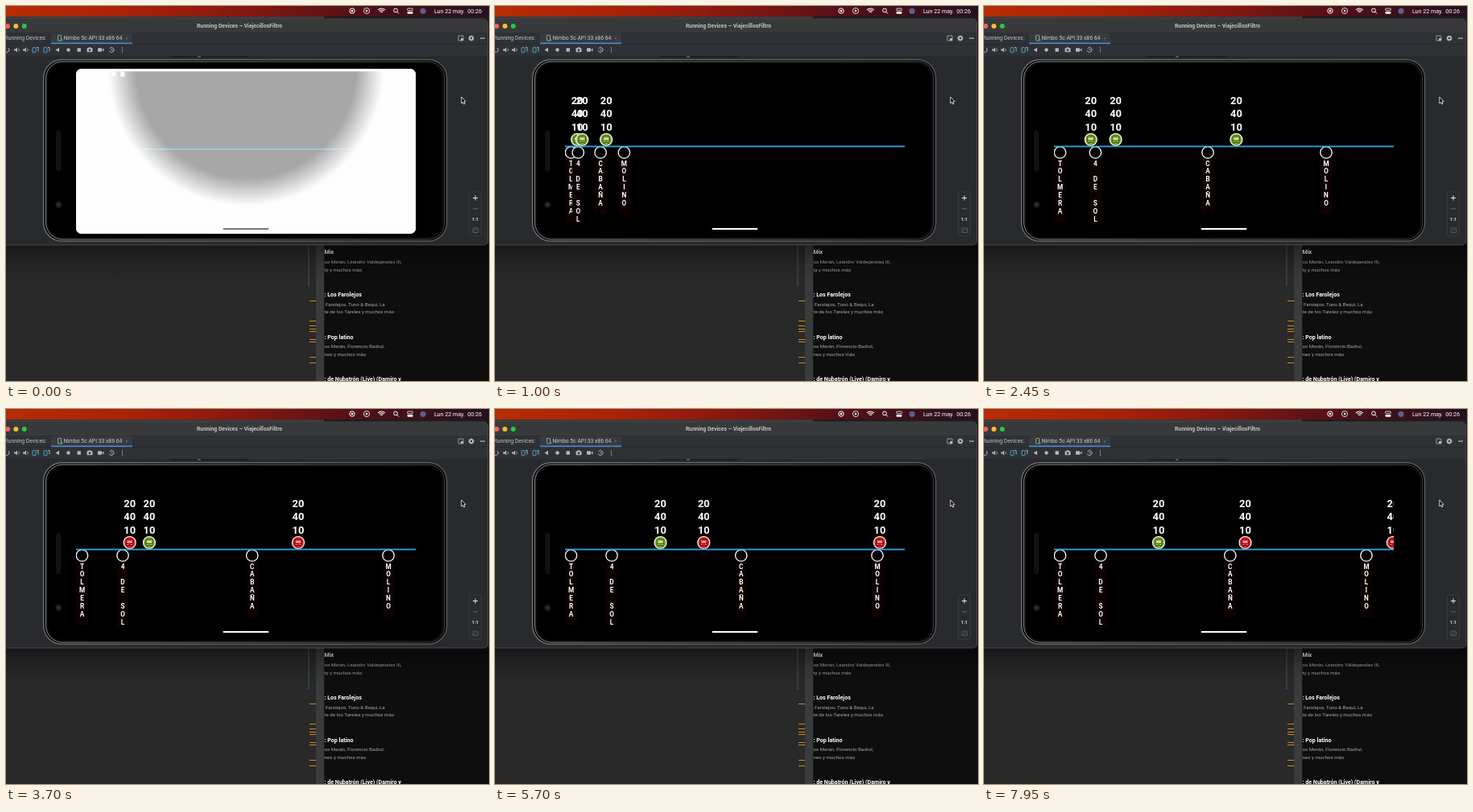
These frames come from a looping animation (600 by 466 pixels, 8000 ms). An HTML page with a canvas:

```html
<!DOCTYPE html>
<html lang="es">
<head>
<meta charset="utf-8">
<title>Running Devices</title>
<style>
html, body { margin: 0; width: 100%; height: 100%; overflow: hidden; background: #101010; }
canvas { display: block; width: 600px; height: 466px; }
</style>
</head>
<body>
<canvas id="stage"></canvas>
<script>
const W = 600, H = 466, LOOP = 8000;
const canvas = document.getElementById('stage');
const dpr = window.devicePixelRatio || 1;
canvas.width = W * dpr;
canvas.height = H * dpr;
const view = canvas.getContext('2d');
let g = view;

const SCREEN = { x: 87, y: 78, w: 422, h: 205 };
const ORIGIN = 94.5;
const stops = [
  { at: 0, name: 'TOLMERA' },
  { at: 50.5, name: '4 DE SOL' },
  { at: 211.3, name: 'CABAÑA' },
  { at: 380.5, name: 'MOLINO' }
];
// Offsets along the line after each position update.
const buses = [
  { at: [44, 164.8, 253], late: true },
  { at: [79.5, 111, 126.5], late: false },
  { at: [252, 383.5, 424], late: true }
];
const OPEN = [640, 2725], MOVE = [3450, 5450], MOVE2 = [6450, 8480];

const clamp = v => Math.max(0, Math.min(1, v));
const span = (t, [a, b]) => clamp((t - a) / (b - a));
const mix = (a, b, p) => a + (b - a) * p;

function rect(x, y, w, h, fill) {
  g.fillStyle = fill;
  g.fillRect(x, y, w, h);
}

function round(x, y, w, h, r, fill, stroke, lw = 1) {
  g.beginPath();
  g.roundRect(x, y, w, h, r);
  paint(fill, stroke, lw);
}

function circle(x, y, r, fill, stroke, lw = 1) {
  g.beginPath();
  g.arc(x, y, r, 0, Math.PI * 2);
  paint(fill, stroke, lw);
}

function paint(fill, stroke, lw) {
  if (fill) { g.fillStyle = fill; g.fill(); }
  if (stroke) { g.strokeStyle = stroke; g.lineWidth = lw; g.stroke(); }
}

function path(points, stroke, lw = 1, fill) {
  g.beginPath();
  points.forEach(([x, y], i) => i ? g.lineTo(x, y) : g.moveTo(x, y));
  if (fill) g.closePath();
  paint(fill, stroke, lw);
}

function text(s, x, y, size, fill, weight = 400, align = 'left') {
  g.font = `${weight} ${size}px Roboto, sans-serif`;
  g.textAlign = align;
  g.textBaseline = 'alphabetic';
  g.fillStyle = fill;
  g.fillText(s, x, y + size * 0.355);
}

function ramp(x0, y0, x1, y1, ...colors) {
  const grad = g.createLinearGradient(x0, y0, x1, y1);
  colors.forEach((c, i) => grad.addColorStop(i / (colors.length - 1), c));
  return grad;
}

function menuBar() {
  rect(0, 0, W, 13, ramp(0, 0, W, 0, '#b62c04', '#a82208', '#86170f', '#4c1019', '#25101f'));
  circle(430, 6, 3.2, null, '#fff', 1);
  rect(428.8, 4.8, 2.4, 2.4, '#fff');
  circle(448, 6, 3.6, null, '#fff', .8);
  path([[447, 4.2], [450, 6], [447, 7.8]], null, 1, '#fff');
  for (const r of [2, 4, 6]) {
    g.beginPath();
    g.arc(466.5, 9, r, -Math.PI * .76, -Math.PI * .24);
    paint(null, '#fff', 1.1);
  }
  circle(484, 5.4, 2.4, null, '#fff', 1);
  path([[485.8, 7.2], [488, 9.6]], '#fff', 1);
  round(498.5, 3, 7, 2.7, 1.3, null, '#fff', .8);
  round(498.5, 7, 7, 2.7, 1.3, '#fff');
  circle(518, 6.3, 3.6, '#5b6088');
  text('Lun 22 may.  00:26', 591, 6.2, 7.1, '#fff', 400, 'right');
}

function editor() {
  rect(0, 290, 386, 176, '#292929');
  rect(385, 290, 10.5, 176, '#3a3b3d');
  g.setLineDash([1, 1]);
  path([[376, 297], [376, 348]], '#4c8a73', 1);
  g.setLineDash([]);
  for (const y of [366, 391, 397, 401, 404, 414, 417, 436, 443])
    rect(377, y, 8, 1, '#c98a1b');
}

function musicList() {
  rect(395.5, 290, 204.5, 176, '#0e0e0e');
  g.save();
  g.beginPath();
  g.rect(395, 290, 205, 176);
  g.clip();
  const items = [
    ['Mix', 'os Merán, Leandro Valdeperales III,', 'ty y muchos más'],
    [': Los Farolejos', ' Farolejos, Tuno & Bequi, La', 'te de Ivo Tareles y muchos más'],
    [': Pop latino', 'os Merán, Florencio Badrul,', 'nes y muchos más'],
    [': de Nubatrón (Live) (Damiro y', '', '']
  ];
  items.forEach(([title, a, b], i) => {
    const y = 305.8 + i * 52.6;
    text(title, 395.5, y, 7.1, '#fff', 700);
    text(a, 395.5, y + 12, 6.2, '#a8a8a8');
    text(b, 395.5, y + 21.5, 6.2, '#a8a8a8');
  });
  g.restore();
}

function toolbarIcons() {
  const c = '#b4b8bc', y = 54.5;
  g.beginPath();
  g.arc(1, y, 3, -.9, Math.PI + .9);
  paint(null, c, 1);
  for (const x of [13, 24]) {
    path([[x - 3, y - 1], [x - 1, y - 1], [x + 1, y - 3], [x + 1, y + 3], [x - 1, y + 1], [x - 3, y + 1]], null, 1, c);
    g.beginPath();
    g.arc(x + 1, y, 2.3, -1, 1);
    paint(null, c, .8);
  }
  for (const x of [36, 50]) {
    round(x - 3, y - 2.8, 4, 6, .6, null, '#4fa3d6', 1);
    path([[x + 2, y - 3], [x + 4, y - 3], [x + 4, y + 2]], c, .9);
  }
  path([[61.5, y], [66, y - 2.7], [66, y + 2.7]], null, 1, c);
  circle(77.5, y, 2.2, c);
  rect(88.5, y - 2.2, 4.4, 4.4, c);
  round(100.5, y - 2.2, 7, 5, .8, c);
  rect(102.5, y - 3.2, 3, 1.5, c);
  circle(104, y + .4, 1.3, '#2e3135');
  round(114, y - 2.3, 5, 4.6, .6, c);
  path([[119, y], [121.5, y - 2], [121.5, y + 2]], null, 1, c);
  g.beginPath();
  g.arc(131, y, 3, -2.5, 2.8);
  paint(null, c, 1);
  path([[131, y - 1.5], [131, y + .3], [132.5, y + .8]], c, .8);
  for (const d of [-2.5, 0, 2.5]) circle(144.5, y + d, .7, c);
}

function windowFrame() {
  rect(0, 13, 395, 4, '#3a3a3b');
  rect(395, 13, 205, 4, '#1c1c1e');
  rect(598, 17, 2, 280, '#2b1113');
  rect(0, 296, W, 50, ramp(0, 296, 0, 346, 'rgba(0,0,0,.42)', 'rgba(0,0,0,.12)', 'rgba(0,0,0,0)'));
  round(-12, 16, 610.5, 281, 5, '#282a2d', '#505153', .8);
  round(-12, 16.3, 610, 17, [5, 5, 0, 0], '#38393b');
  circle(2, 25, 3, '#ff5f57');
  circle(12.3, 25, 3, '#febc2e');
  circle(22.7, 25, 3, '#28c840');
  text('Running Devices – ViajecillosFiltro', 237, 24.5, 6.8, '#c2c3c4', 700);

  rect(0, 33, 598, 29, '#2e3135');
  rect(0, 47, 598, .6, '#25272a');
  rect(56, 34, 101, 13, '#373b40');
  rect(56, 45.5, 101, 1.7, '#4a88c7');
  text('Running Devices:', -1.5, 40, 6.8, '#bfc2c5');
  round(64.5, 36.5, 4, 6.5, .7, null, '#b4b8bc', .8);
  circle(69, 42.3, 1.3, '#58a65b');
  text('Nimbo 5c API 33 x86 64', 71.5, 40, 6.8, '#c8cbce');
  text('×', 150, 40, 6, '#777b80', 400, 'center');
  round(562, 37, 6, 6, .5, null, '#b4b8bc', .8);
  rect(565, 40, 3, 3, '#b4b8bc');
  circle(578, 40, 2.1, null, '#c2c5c8', 1.5);
  for (let i = 0; i < 8; i++) {
    const a = i * Math.PI / 4;
    circle(578 + 3 * Math.cos(a), 40 + 3 * Math.sin(a), .65, '#c2c5c8');
  }
  rect(589, 39.5, 6, 1.1, '#c2c5c8');
  toolbarIcons();
}

function phone() {
  rect(205, 62.3, 97, 1.2, '#17181a');
  rect(238, 62.3, 4, 1.2, '#77787a');
  const rim = (left, right) => ramp(46, 0, 548, 0, left, right);
  round(46.6, 66.6, 501, 225.6, 23, '#0a0a0b', rim('#77797b', '#5c5e60'), 1.2);
  round(49.6, 69, 495, 221, 21, '#020202', rim('#8b8d8f', '#3c3e40'), 1);
  round(51.5, 70.8, 491, 217.4, 20, '#000', '#1c1d1e', .7);
  round(62.8, 155, 4.8, 50, 2.4, '#111112', '#222223', .7);
  circle(65.3, 247, 3.5, '#18191b', '#28292b', .8);
  circle(65.3, 247, 1.3, '#44474c');
}

function zoomPanel() {
  round(575.5, 231, 15, 55, 2, '#292b2e', '#3b3d40', .8);
  rect(580, 238, 6, 1.1, '#d8d9da');
  rect(582.45, 235.5, 1.1, 6, '#d8d9da');
  rect(580, 251.5, 6, 1, '#686a6c');
  text('1:1', 583, 265.3, 6, '#d8d9da', 700, 'center');
  round(580, 276, 6.5, 5.5, .5, null, '#66686a', .8);
  path([[581.5, 280], [585, 277.5]], '#66686a', .7);
}

function cursor() {
  path([[565.8, 113], [565.8, 121], [567.5, 119.5], [568.7, 122], [570, 121.4],
    [568.9, 118.8], [571, 118.6]], '#e6e6e6', .9, '#080808');
}

function busIcon(x, red) {
  const base = red ? '#e01f26' : '#7fa82c', dark = red ? '#6d1013' : '#3f5a15';
  const pale = red ? '#f3a3a5' : '#cfe0a4', y = 166;
  circle(x, y, 7.5, base, '#fff', 1.2);
  round(x - 4.2, y - 4.4, 8.4, 8, 1.3, base, dark, 1);
  rect(x - 3, y - 2.2, 6, 2.8, pale);
  rect(x - 4.2, y + .8, 8.4, .8, dark);
  rect(x - 3.2, y + 2, 1.6, .8, pale);
  rect(x + 1.6, y + 2, 1.6, .8, pale);
  rect(x - 3.6, y + 3.6, 1.7, 1.3, dark);
  rect(x + 1.9, y + 3.6, 1.7, 1.3, dark);
}

function drawStop(x, name) {
  rect(x - 7.5, 190, 15, Math.min(80, name.length * 10 + 9), '#0d0102');
  circle(x, 182, 7.2, '#000', '#fff', 1.3);
  [...name].forEach((ch, i) => text(ch, x, 195.6 + i * 9.95, 8.2, '#fff', 700, 'center'));
}

function routeMap(t) {
  if (t >= OPEN[0]) {
    const scale = span(t, OPEN);
    for (const s of stops) drawStop(ORIGIN + s.at * scale, s.name);
    for (const { at: [a, b, c], late } of buses) {
      const at = mix(mix(a, b, span(t, MOVE)), c, span(t, MOVE2));
      const x = ORIGIN + at * scale;
      ['20', '40', '10'].forEach((n, i) => text(n, x, 117 + i * 16.6, 12.9, '#fff', 700, 'center'));
      busIcon(x, late && t >= MOVE[0]);
    }
  }
  rect(87, 173.6, 422, 1.8, '#31a7e3');
}

// White launch cover with a growing soft hole; the map slides up behind it.
function launchCover(t) {
  const p = t / 250, lift = 3.3 * (1 - p);
  const r = mix(170, 375, p), shade = Math.round(mix(168, 0, clamp(t / 150)));
  rect(SCREEN.x, SCREEN.y, SCREEN.w, SCREEN.h, '#fdfdfd');
  rect(SCREEN.x, SCREEN.y + lift, SCREEN.w, SCREEN.h, `rgb(${shade},${shade},${shade})`);
  rect(87, 173.9 + lift, 422, 1.5, t < 60 ? '#9fd0e7' : '#31a7e3');
  const hole = g.createRadialGradient(298, 77, r * .8, 298, 77, r);
  hole.addColorStop(0, 'rgba(253,253,253,0)');
  hole.addColorStop(.5, 'rgba(253,253,253,.5)');
  hole.addColorStop(1, '#fdfdfd');
  rect(SCREEN.x, SCREEN.y, SCREEN.w, SCREEN.h, hole);
  circle(133.5, 84.5, 2.8, '#fff');
  round(142.3, 81.5, 5, 6.3, .7, '#fff');
}

function screen(t) {
  g.save();
  g.beginPath();
  g.roundRect(SCREEN.x, SCREEN.y, SCREEN.w, SCREEN.h, 7);
  g.clip();
  rect(SCREEN.x, SCREEN.y, SCREEN.w, SCREEN.h, '#000');
  const covered = t < 250;
  if (covered) launchCover(t);
  else routeMap(t);
  round(269.5, 275.9, 57, 2.2, 1.1, covered ? '#777' : '#fff');
  g.restore();
}

const backdrop = document.createElement('canvas');
function buildBackdrop() {
  backdrop.width = canvas.width;
  backdrop.height = canvas.height;
  g = backdrop.getContext('2d');
  g.scale(dpr, dpr);
  rect(0, 0, W, H, '#101010');
  menuBar();
  editor();
  musicList();
  windowFrame();
  phone();
  zoomPanel();
  cursor();
  g = view;
}

function frame(now) {
  const t = (now - start) % LOOP;
  g.setTransform(1, 0, 0, 1, 0, 0);
  g.drawImage(backdrop, 0, 0);
  g.setTransform(dpr, 0, 0, dpr, 0, 0);
  screen(Math.max(0, t));
  requestAnimationFrame(frame);
}

buildBackdrop();
const start = performance.now();
frame(start);
</script>
</body>
</html>
```
